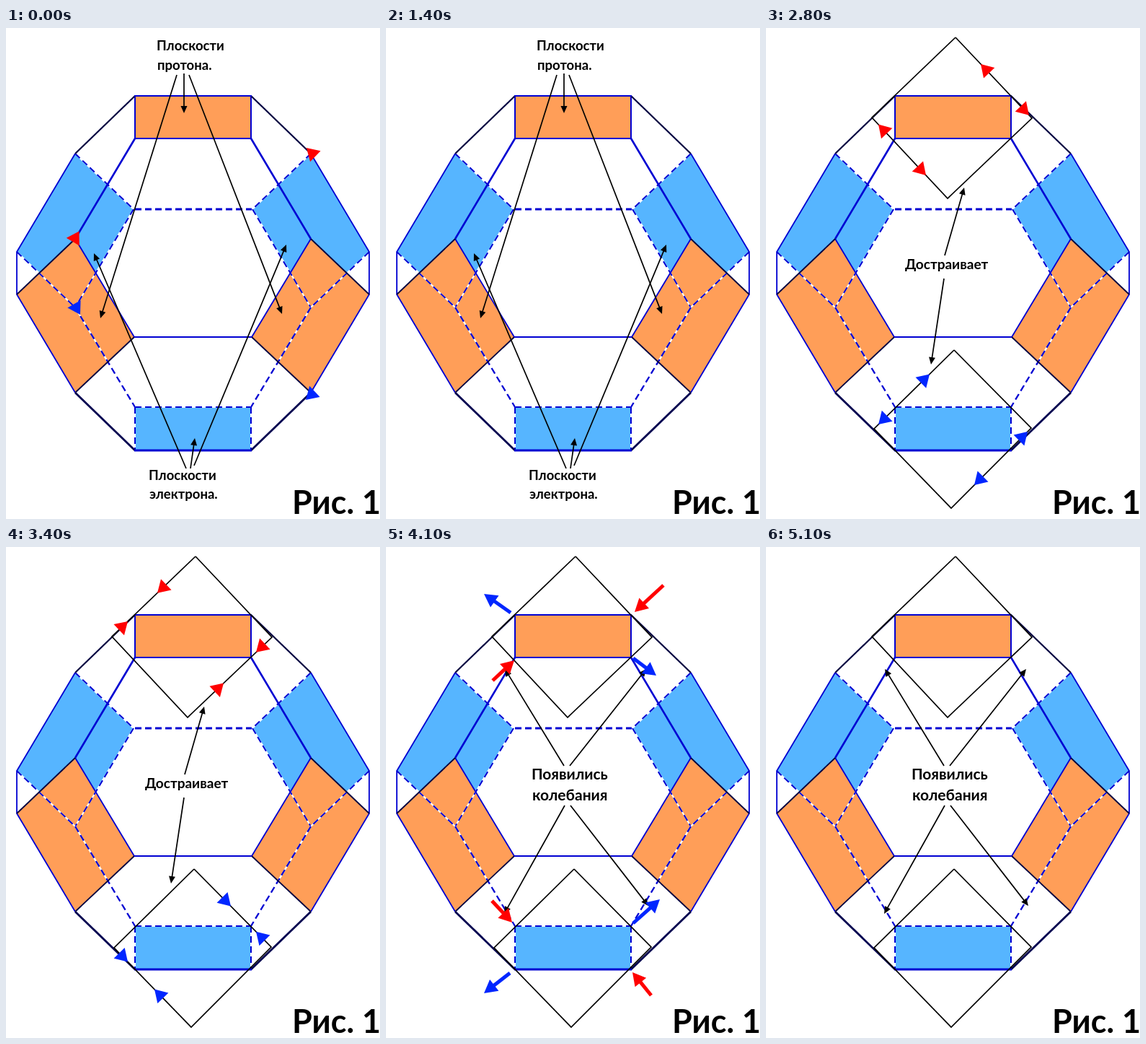
These frames come from a looping animation (519x680 px, 5300 ms). An HTML page:

```html
<!DOCTYPE html>
<html lang="ru">
<head>
<meta charset="utf-8">
<style>
html, body { margin: 0; width: 100%; height: 100%; overflow: hidden; background: #fff; }
svg { display: block; width: 519px; height: 680px; }
text { font-family: Lato, "Open Sans", sans-serif; font-weight: 700; fill: #000; }
</style>
</head>
<body>
<svg id="stage" viewBox="0 0 519 680"></svg>
<script>
const NS = 'http://www.w3.org/2000/svg';
const stage = document.getElementById('stage');
const LOOP = 5300, CX = 519;
const BLUE = '#0000d2', RED = '#ff0000', ROYAL = '#0026ff', ORANGE = '#ff9e58', SKY = '#56b5ff';

function add(parent, tag, attrs, content) {
  const el = document.createElementNS(NS, tag);
  for (const k in attrs) el.setAttribute(k, attrs[k]);
  if (content) el.textContent = content;
  parent.appendChild(el);
  return el;
}
const group = () => add(stage, 'g', {});
const fill = (g, pts, color) => add(g, 'polygon', { points: pts.join(' '), fill: color });
const line = (g, pts, color, width, dash) => add(g, 'polyline', {
  points: pts.join(' '), fill: 'none', stroke: color, 'stroke-width': width,
  'stroke-dasharray': dash || 'none'
});
const label = (g, x, y, size, str) => add(g, 'text', { x, y, 'font-size': size }, str);
const mirror = pts => pts.map(([x, y]) => [CX - x, y]);
const lerp = (a, b, k) => [a[0] + (b[0] - a[0]) * k, a[1] + (b[1] - a[1]) * k];
const show = (el, on) => el.setAttribute('visibility', on ? 'visible' : 'hidden');

// Triangle with its tip at a point, heading along (dx, dy)
function head(tip, [dx, dy], len = 17, half = 10.5) {
  const n = Math.hypot(dx, dy), ux = dx / n, uy = dy / n;
  const bx = tip[0] - ux * len, by = tip[1] - uy * len;
  return [tip, [bx - uy * half, by + ux * half], [bx + uy * half, by - ux * half]];
}
function arrow(g, from, to, color, width, len, half) {
  const d = [to[0] - from[0], to[1] - from[1]];
  const k = 1 - (len - 1) / Math.hypot(d[0], d[1]);
  line(g, [from, lerp(from, to, k)], color, width);
  fill(g, head(to, d, len, half), color);
}
const pointer = (g, from, to) => arrow(g, from, to, '#000', 1.7, 10, 4.5);

// Solid body
const body = group();
const skyFace = [[96, 174], [177, 251], [96, 387], [15, 310]];
const orangeFace = [[15, 369], [96, 292], [178, 428], [96, 505]];
fill(body, [[179, 525], [340, 525], [340, 585], [179, 585]], SKY);
fill(body, [[179, 94], [340, 94], [340, 153], [179, 153]], ORANGE);
for (const side of [p => p, mirror]) {
  fill(body, side(skyFace), SKY);
  fill(body, side(orangeFace), ORANGE);
}
function dashed(pts, width = 2) {
  line(body, pts, '#fff', width);
  line(body, pts, BLUE, width, '9 5');
}
dashed([[179, 251], [341, 251]], 3);
dashed([[179, 525], [341, 525]]);
for (const side of [p => p, mirror]) {
  dashed(side([[96, 174], [177, 251]]));
  dashed(side([[177, 251], [96, 387]]));
  dashed(side([[15, 310], [96, 387]]));
  dashed(side([[96, 387], [179, 525]]), 2.3);
  dashed(side([[179, 525], [179, 585]]));
  line(body, side([[96, 174], [15, 310], [15, 369], [96, 505]]), BLUE, 1.8);
  line(body, side([[96, 292], [178, 428]]), BLUE, 1.8);
  line(body, side([[179, 153], [96, 292]]), BLUE, 2.6);
  line(body, side([[179, 94], [179, 153]]), BLUE, 2);
  line(body, side([[179, 94], [96, 174]]), '#000040', 2.2);
  line(body, side([[96, 292], [15, 369]]), '#000040', 1.8);
  line(body, side([[178, 428], [96, 505]]), '#000040', 1.8);
  line(body, side([[96, 505], [179, 585]]), '#000050', 2.8);
}
for (const [y, w] of [[94, 2], [153, 2], [428, 1.8], [585, 2.8]])
  line(body, [[178, y], [341, y]], BLUE, w);
label(body, 397, 673, 45, 'Рис. 1');

// Scene 1: planes
const planes = group();
label(planes, 209, 31, 18.5, 'Плоскости');
label(planes, 210, 58, 18.5, 'протона.');
label(planes, 198, 626, 18.5, 'Плоскости');
label(planes, 199, 652, 18.5, 'электрона.');
[
  [[237, 65], [131, 402]], [[247, 63], [247, 118]], [[254, 65], [383, 396]],
  [[250, 610], [122, 312]], [[256, 610], [262, 568]], [[261, 606], [389, 300]]
].forEach(([a, b]) => pointer(planes, a, b));

const runners = group();
const tracks = [
  [RED, [101.5, 281.5], [163.5, 177], [178.5, 153.5]],
  [RED, [417, 166], [362, 113.5], [342.5, 94.5]],
  [ROYAL, [103, 397], [161, 497], [178.5, 525]],
  [ROYAL, [416, 515], [360, 567.5], [342.5, 585]]
].map(([color, a, b, c]) => ({
  el: add(runners, 'polygon', { fill: color }), a, b, c,
  dir: [b[0] - a[0], b[1] - a[1]]
}));

// Scenes 2 and 3: diamonds
const diamonds = group();
const top1 = [263, 13], right1 = [369, 125], low1 = [252, 236], left1 = [147, 124];
const top2 = [261, 446], right2 = [368, 554], low2 = [257, 665], left2 = [150, 555];
line(diamonds, [top1, right1, low1, left1, top1], '#000', 1.7);
line(diamonds, [top2, right2, low2, left2, top2], '#000', 1.7);

const builds = group();
label(builds, 193, 334, 19, 'Достраивает');
pointer(builds, [248, 315], [275, 221]);
pointer(builds, [247, 347], [229, 466]);

// corner, previous corner, next corner, x distance before and after the turn
const turns = [
  [RED, top1, right1, left1, 35, 53],
  [RED, right1, top1, low1, 4, 22],
  [RED, left1, low1, top1, 9, 22],
  [RED, low1, left1, right1, 30, 50],
  [ROYAL, top2, left2, right2, 34, 51],
  [ROYAL, right2, low2, top2, 5, 21],
  [ROYAL, left2, top2, low2, 6, 19],
  [ROYAL, low2, right2, left2, 32, 51]
].map(([color, at, from, to, before, after]) => ({
  el: add(builds, 'polygon', { fill: color }), at, from, to, before, after
}));
const along = (a, b, dx) => lerp(a, b, dx / Math.abs(b[0] - a[0]));

const waves = group();
label(waves, 202, 322, 21, 'Появились');
label(waves, 203, 351, 21, 'колебания');
[
  [[247, 303], [165, 169]], [[255, 303], [361, 169]],
  [[248, 358], [164, 508]], [[256, 358], [364, 497]]
].forEach(([a, b]) => pointer(waves, a, b));

const pulses = group();
[
  [RED, [385, 53], [345, 90]], [RED, [148, 185], [178, 157]],
  [RED, [147, 490], [175, 520]], [RED, [368, 621], [342, 589]],
  [ROYAL, [173, 91], [136, 65]], [ROYAL, [343, 154], [375, 178]],
  [ROYAL, [343, 521], [380, 488]], [ROYAL, [172, 590], [136, 618]]
].forEach(([color, a, b]) => arrow(pulses, a, b, color, 5, 18, 10));

function draw(t) {
  const first = t < 2800, second = !first && t < 3700, third = t >= 3700;
  const blink = from => Math.floor((t - from) / 200) % 2 === 0;
  show(planes, first);
  show(runners, first && (t < 1200 || blink(1200)));
  show(diamonds, !first);
  show(builds, second);
  show(waves, third);
  show(pulses, third && blink(3700));

  const step = Math.min(4, Math.floor(t / 300));
  for (const r of tracks) {
    const tip = step < 4 ? lerp(r.a, r.b, step / 3) : r.c;
    r.el.setAttribute('points', head(tip, r.dir).join(' '));
  }
  const phase = Math.max(0, Math.min(2, Math.floor((t - 2800) / 300)));
  for (const { el, at, from, to, before, after } of turns) {
    const end = phase < 2 ? at : to, start = phase < 2 ? from : at;
    const tip = phase === 2 ? along(at, to, after) : along(at, from, phase ? -7 : before);
    el.setAttribute('points', head(tip, [end[0] - start[0], end[1] - start[1]]).join(' '));
  }
}

const began = performance.now();
function tick() {
  draw((performance.now() - began) % LOOP);
  requestAnimationFrame(tick);
}
draw(0);
tick();
</script>
</body>
</html>
```
